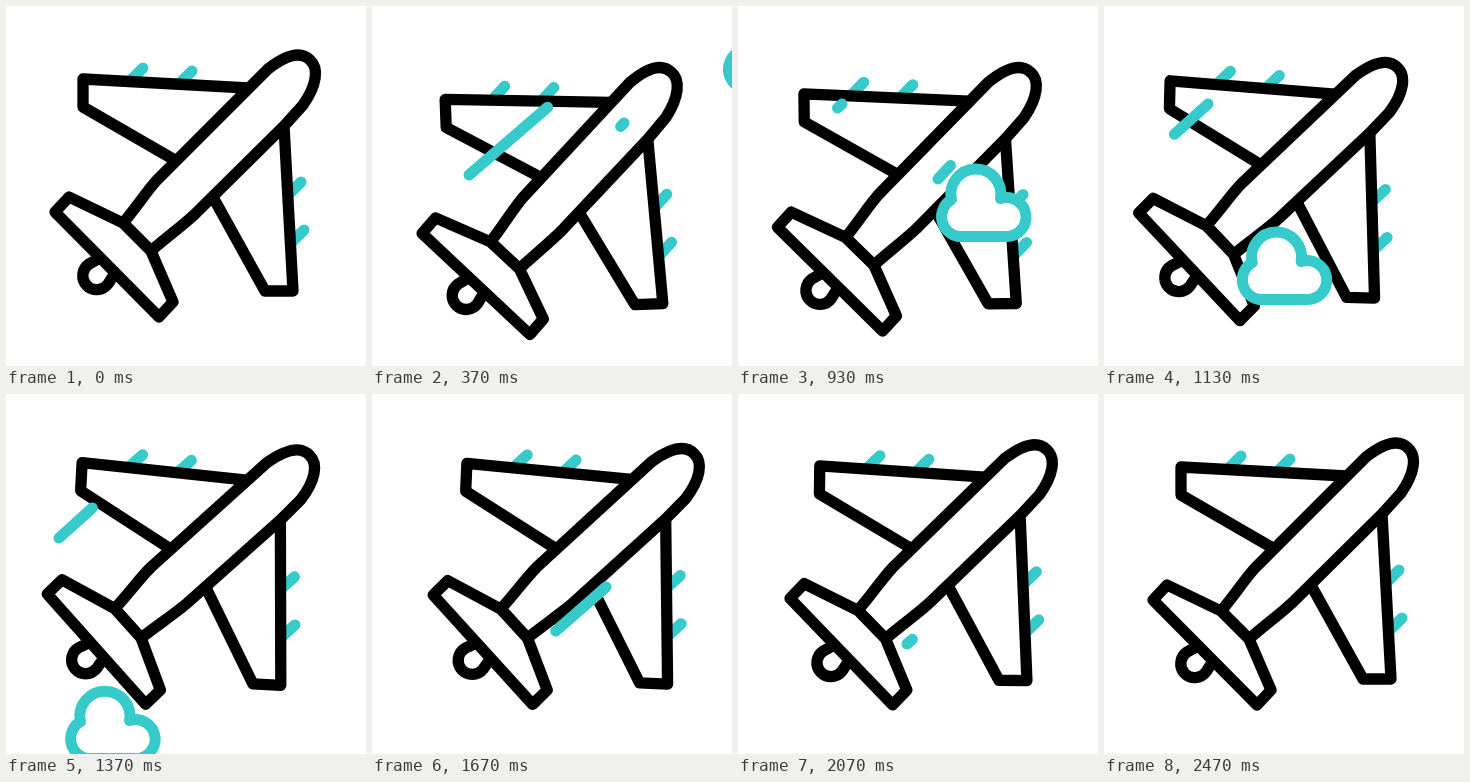
These frames come from a looping animation (360 by 360 pixels, 2500 ms). An HTML page:

```html
<!DOCTYPE html>
<html lang="en">
<head>
<meta charset="utf-8">
<title>Plane</title>
<style>
  html, body { margin: 0; height: 100%; overflow: hidden; background: #fff; }
  svg { display: block; width: 100vw; height: 100vh; }
  path { fill: #fff; stroke: #000; stroke-width: 11.3; stroke-linecap: round; stroke-linejoin: round; }
  .teal { stroke: #36caca; stroke-width: 11; }
</style>
</head>
<body>
<svg viewBox="0 0 360 360">
  <g id="plane">
    <path class="teal" d="M137 62l-12 12M186 65l-12 12M295 176l-12 12M298 224l-12 12"/>
    <path d="M242 82L77 73V101L167 153M278 120L287 285H259L208 193"/>
    <path d="M94 252L83 258A14 14 0 1 0 102 278L109 267"/>
    <path d="M117 217C130 202 140 186 151 174L262 63C280 49 295 45 304 54C313 62 311 79 297 99L278 120L190 207C180 217 161 231 145 245Z"/>
    <path d="M117 217L63 191L49 206L153 311L167 296L145 245Z"/>
  </g>
  <g id="streaks"></g>
  <path id="cloud" class="teal" d="M221 230H268A19.5 19.5 0 1 0 263 192A25 25 0 1 0 214 193A20 20 0 0 0 221 230Z"/>
</svg>
<script>
const LOOP = 2500;
const plane = document.getElementById('plane');
const cloud = document.getElementById('cloud');
const clamp = u => Math.max(0, Math.min(1, u));

// Eased change by `amount` between two times
const ease = (t, from, to, amount) => {
  const u = clamp((t - from) / (to - from));
  return amount * u * u * (3 - 2 * u);
};

const planeX = t => ease(t, 450, 1200, -14) + ease(t, 1200, 1700, 27.5) + ease(t, 1700, 2250, -13.5);
const planeY = t => ease(t, 0, 600, 24.5) + ease(t, 600, 1300, -23.5) + ease(t, 1300, 2400, -1);
const planeTilt = t => ease(t, 0, 580, -3) + ease(t, 580, 1400, 6) + ease(t, 1400, 2400, -3);
const cloudShift = t => 185 + ease(t, 40, 1990, -426);

// The line grows from its first point, then its tail catches up
function streak(start, duration, x, y, dx, dy) {
  const path = document.createElementNS('http://www.w3.org/2000/svg', 'path');
  path.setAttribute('class', 'teal');
  document.getElementById('streaks').append(path);
  const point = k => `${x + dx * k} ${y + dy * k}`;
  return t => {
    const u = (t - start) / duration;
    const visible = u > 0 && u < 1;
    path.setAttribute('d', visible ? `M${point(clamp(2 * u - 1))}L${point(clamp(2 * u))}` : '');
  };
}

const streaks = [
  streak(30, 670, 177, 100, -80, 69),
  streak(350, 660, 252, 117, -52, 56),
  streak(900, 700, 104, 98, -51, 46),
  streak(1400, 700, 234, 193, -65, 57),
];

function draw(t) {
  plane.setAttribute('transform', `translate(${planeX(t)} ${planeY(t)}) rotate(${planeTilt(t)} 182 179)`);
  const shift = cloudShift(t);
  cloud.setAttribute('transform', `translate(${shift} ${-0.965 * shift})`);
  streaks.forEach(update => update(t));
}

const began = performance.now();
function tick() {
  draw((performance.now() - began) % LOOP);
  requestAnimationFrame(tick);
}
tick();
</script>
</body>
</html>
```
